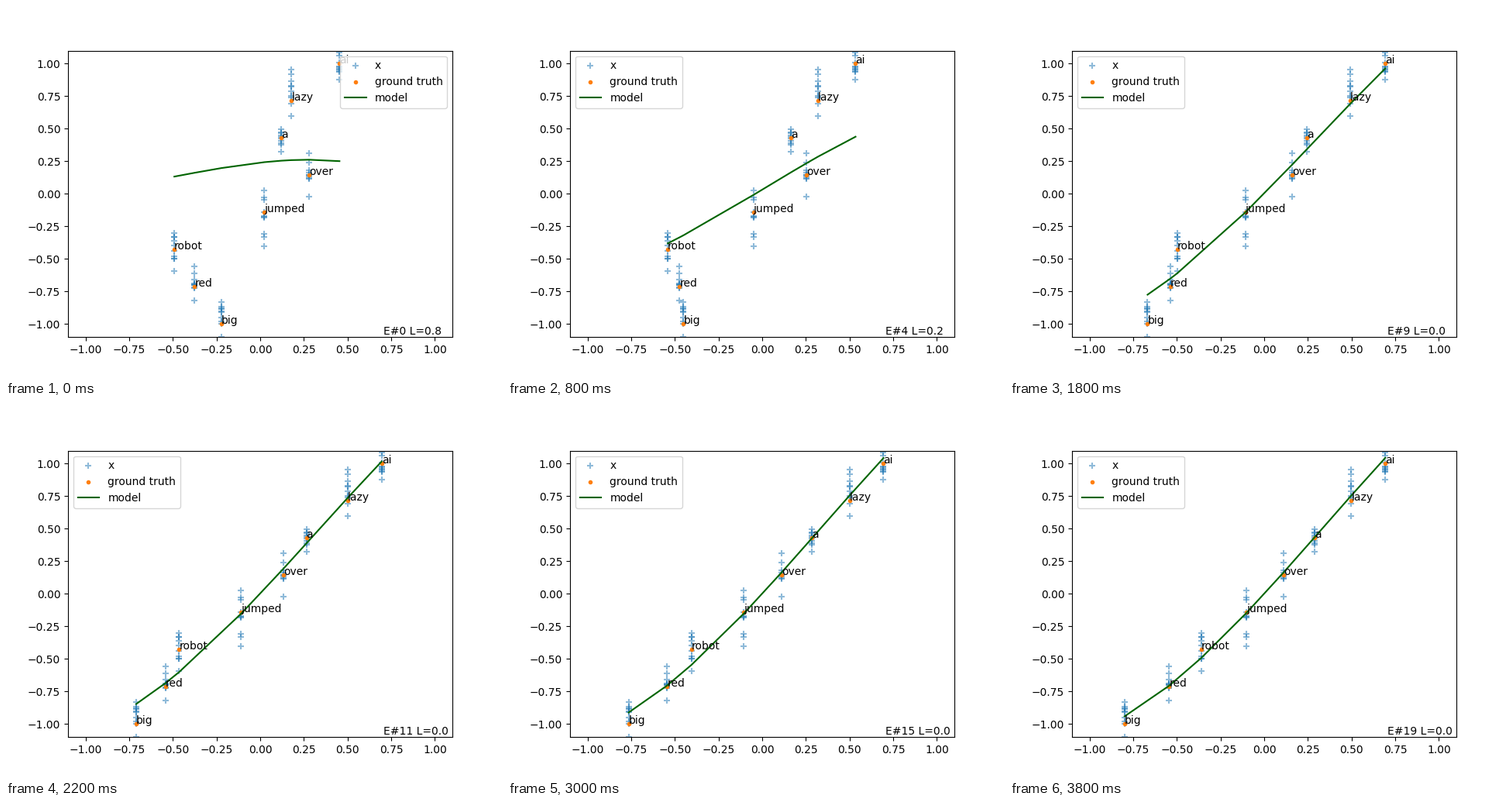
Write a matplotlib script that moves like this. It is 640 px wide and 480 px high and loops after 6 s.

```python
import numpy as np
import matplotlib.pyplot as plt
from matplotlib.animation import FuncAnimation

EPOCHS = 20
PX_PER_UNIT = 496 / 2.2
PER_WORD = 10

# word: start px, swing px, pace, sharpness, late drift px, lowest and highest sample
WORDS = {
    "big": (278.2, -90, 4.74, 1.6, -48, -1.10, -0.83),
    "red": (243.3, -38, 4.4, 1.65, 0, -0.82, -0.56),
    "robot": (217.2, -22, 3.5, 1.75, 61, -0.59, -0.30),
    "jumped": (333.3, -33, 4.73, 1.85, 6, -0.40, 0.025),
    "over": (391, -38, 8.26, 2.5, 0, -0.02, 0.31),
    "a": (355.2, 38, 7.7, 1.8, 0, 0.325, 0.495),
    "lazy": (368.4, 74.2, 5.2, 2.2, -2.6, 0.60, 0.955),
    "ai": (430.3, 55.2, 5.5, 2.86, -1.5, 0.88, 1.085),
}
TRUTH = np.linspace(-1, 1, len(WORDS))
START, SWING, PACE, SHARP, DRIFT, LOW, HIGH = np.array(list(WORDS.values())).T

rng = np.random.default_rng(4)
SAMPLES = np.vstack([
    LOW, HIGH, rng.triangular(LOW, TRUTH, HIGH, (PER_WORD - 2, len(WORDS)))])


def rise(t, pace, sharp):
    """Ease from 0 towards 1."""
    return 1 - np.exp(-(t / pace) ** sharp)


def embed(t):
    px = START + SWING * rise(t, PACE, SHARP) + DRIFT * rise(t, 14, 2)
    return (px - 328) / PX_PER_UNIT


def model(x, t):
    """Cubic that bends from a flat arch into the fitted curve."""
    k = rise(t, 5, 1.6)
    bias = 0.24 * np.exp(-t / 2)
    slope = 0.149 + 1.316 * k
    bend = -0.21 + 0.41 * k
    cubic = -0.14 - 0.06 * k
    return bias + slope * x + bend * x**2 + cubic * x**3


def loss(t):
    return max(0, 0.45 - 0.054 * t) + 0.35 * np.exp(-3 * t)


fig, ax = plt.subplots(figsize=(6.4, 4.8), dpi=100)


def draw(i):
    epoch = min(i, EPOCHS - 1)
    x = embed(epoch)
    line_x = np.sort(x)

    ax.clear()
    ax.set_xlim(-1.1, 1.1)
    ax.set_ylim(-1.1, 1.1)
    ax.scatter(np.tile(x, PER_WORD), SAMPLES.ravel(), marker="+", color="C0",
               alpha=0.5, label="x")
    ax.scatter(x, TRUTH, marker=".", color="C1", label="ground truth")
    ax.plot(line_x, model(line_x, epoch), color="darkgreen", label="model")
    for word, wx, wy in zip(WORDS, x, TRUTH):
        ax.text(wx, wy, word)
    ax.text(0.705, -1.08, f"E#{epoch} L={loss(epoch):.1f}")
    ax.legend(loc="upper right" if epoch < 2 else "upper left")
    return []


anim = FuncAnimation(fig, draw, frames=30, interval=200,
                     init_func=lambda: draw(0), repeat=True, repeat_delay=0)
plt.show()
```
